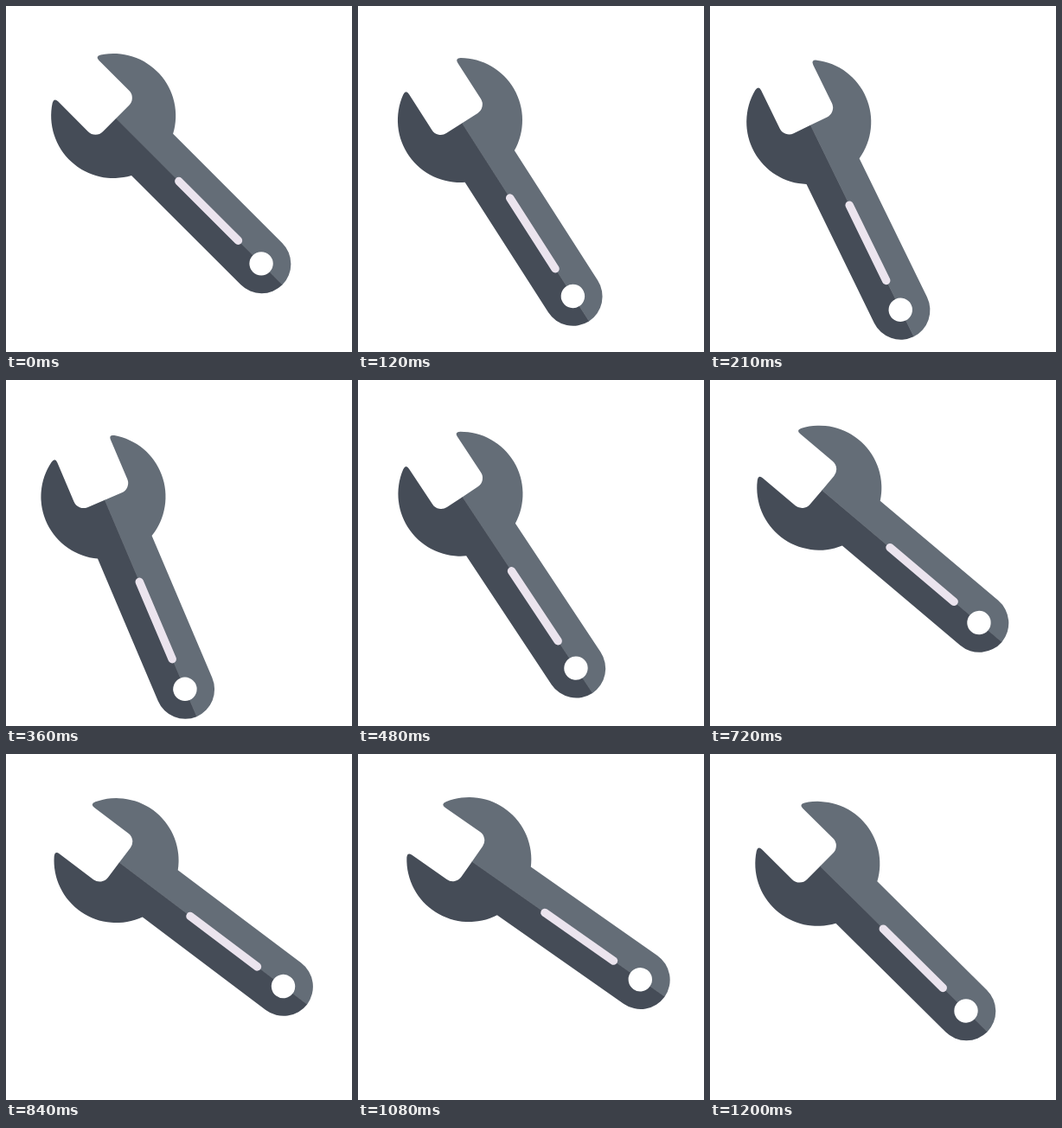
Recreate the animation shown at these times as an HTML page. Size 400 px wide and 400 px high, loop 1230 ms.

```html
<!DOCTYPE html>
<html lang="en">
<head>
<meta charset="utf-8">
<title>Wrench</title>
<style>
  html, body { margin: 0; width: 100%; height: 100%; overflow: hidden; background: #fff; }
  svg { display: block; width: 100%; height: 100%; }
</style>
</head>
<body>
<svg viewBox="0 0 400 400">
  <defs>
    <!-- Upper half; the handle runs along +x from the pivot -->
    <path id="half" d="M41.2 0V-21.5A12 12 0 0 0 29.2 -33.5H-20Q-26.7 -33.5 -23.2 -39.5
      A72 72 0 0 1 100.5 -34H279A34.3 34.3 0 0 1 313.3 0Z"/>
  </defs>
  <g id="wrench" transform="translate(98 100.8) rotate(45)">
    <path d="M41.2 -.3H313V.3H41.2Z" fill="#454c57"/>
    <use href="#half" fill="#646d77"/>
    <use href="#half" fill="#454c57" transform="scale(1 -1)"/>
    <path d="M144 0H241" stroke="#ebe4ee" stroke-width="9.5" stroke-linecap="round"/>
    <circle cx="278.7" r="13.7" fill="#fff"/>
  </g>
</svg>
<script>
  const LOOP = 1230, STEP = 30;
  const wrench = document.getElementById('wrench');

  function bezier(x1, y1, x2, y2) {
    const at = (a, b, s) => 3 * (1 - s) ** 2 * s * a + 3 * (1 - s) * s * s * b + s ** 3;
    return x => {
      let lo = 0, hi = 1;
      for (let i = 0; i < 24; i++) {
        const mid = (lo + hi) / 2;
        if (at(x1, x2, mid) < x) lo = mid; else hi = mid;
      }
      return at(y1, y2, lo);
    };
  }

  const ease = bezier(.25, .1, .25, 1);
  const swings = [
    { start: 0, end: 369, from: 45, to: 67, curve: ease },
    { start: 369, end: 1088, from: 67, to: 35, curve: bezier(.2, .3, .25, 1) },
    { start: 1088, end: LOOP, from: 35, to: 45, curve: ease },
  ];

  function angleAt(t) {
    const { start, end, from, to, curve } = swings.find(s => t < s.end);
    return from + (to - from) * curve((t - start) / (end - start));
  }

  function draw() {
    // The motion advances in 30 ms steps; the offset absorbs timer jitter
    const t = Math.floor(performance.now() / STEP + .05) * STEP % LOOP;
    wrench.setAttribute('transform', `translate(98 100.8) rotate(${angleAt(t).toFixed(3)})`);
    requestAnimationFrame(draw);
  }
  draw();
</script>
</body>
</html>
```
